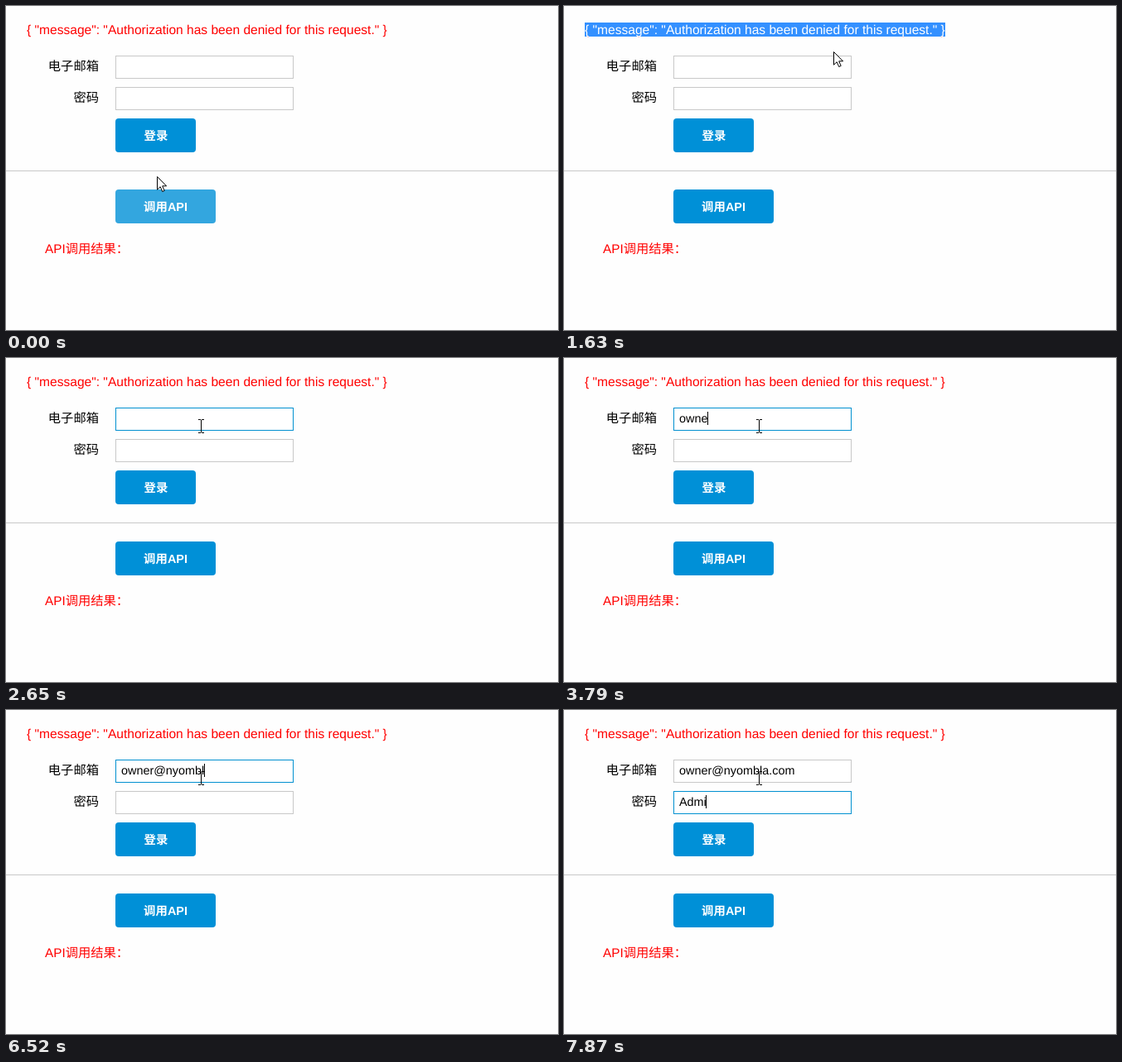
Write an HTML page that moves like this. It is 666 by 392 pixels and loops after 8 s.

```html
<!DOCTYPE html>
<html lang="zh-CN">
<head>
<meta charset="utf-8">
<title>登录</title>
<style>
html, body { margin: 0; width: 100%; height: 100%; overflow: hidden; background: #fefefe; }
svg { display: block; }
text {
  font: 15.3px "Liberation Sans", "Noto Sans CJK SC", "Noto Sans CJK", sans-serif;
  text-rendering: geometricPrecision;
  white-space: pre;
}
text.msg { font-size: 15.57px; }
text.entry, text.btn { font-size: 14.4px; }
text.btn { fill: #fff; text-anchor: middle; font-weight: bold; }
.label { text-anchor: end; }
.red { fill: #f00; }
.box { fill: #fff; stroke: #c8c8c8; }
.focus { fill: none; stroke: #0090d0; }
.blue { fill: #0090d7; }
</style>
</head>
<body>
<svg width="666" height="392" viewBox="0 0 666 392">
  <defs><clipPath id="clip"><rect id="clipBox" y="20" height="17"/></clipPath></defs>

  <text class="msg red" x="25" y="34">{ "message": "Authorization has been denied for this request." }</text>
  <g id="selection" clip-path="url(#clip)">
    <rect x="25" y="20" width="435" height="17" fill="#3390ff"/>
    <text class="msg" x="25" y="34" fill="#fff">{ "message": "Authorization has been denied for this request." }</text>
  </g>

  <text class="label" x="112" y="78">电子邮箱</text>
  <text class="label" x="112" y="116">密码</text>
  <rect class="box" x="132.5" y="60.5" width="214" height="27"/>
  <rect class="box" x="132.5" y="98.5" width="214" height="27"/>
  <rect class="focus" id="mailFocus" x="132.5" y="60.5" width="214" height="27"/>
  <rect class="focus" id="passFocus" x="132.5" y="98.5" width="214" height="27"/>
  <text class="entry" id="mail" x="139" y="78"></text>
  <text class="entry" id="pass" x="139" y="116"></text>
  <rect id="caret" width="1" height="16"/>

  <rect class="blue" x="132" y="136" width="97" height="41" rx="4"/>
  <text class="btn" x="181" y="162">登录</text>
  <rect y="199" width="666" height="1" fill="#c8c8c8"/>
  <rect class="blue" id="api" x="132" y="222" width="121" height="41" rx="4"/>
  <text class="btn" x="192.5" y="248">调用API</text>
  <text class="red" x="47" y="299">API调用结果：</text>

  <path id="arrow" d="M.5 .5V16.2L4.2 12.7L6.7 18.5L9.2 17.4L6.7 11.8H11.6Z" fill="#fff" stroke="#000"/>
  <path id="beam" d="M-3 -7.5H0M1 -7.5H4M.5 -7V8M-3 8.5H0M1 8.5H4" fill="none" stroke="#000"/>
</svg>
<script>
const LOOP = 8000, CLICK = 2120, TAB = 7210, BLINK = 530;

// Bursts of typing: first key, time between keys, text
const mailKeys = keys([3330, 152, 'owner'], [4620, 310, '@n'], [5210, 120, 'yo'],
  [5790, 430, 'mb'], [6520, 150, 'la'], [6790, 105, '.com']);
const passKeys = keys([7470, 133, 'Admi']);
const inputTimes = [CLICK, TAB, ...[...mailKeys, ...passKeys].map(k => k.time)];

function keys(...bursts) {
  return bursts.flatMap(([start, gap, text]) =>
    [...text].map((char, i) => ({ time: start + i * gap, char })));
}

const $ = id => document.getElementById(id);
const set = (id, attrs) => {
  for (const name in attrs) $(id).setAttribute(name, attrs[name]);
};
const mix = (a, b, p) => a + (b - a) * p;

// Progress from 0 to 1 between two times, in n equal steps
function ramp(t, from, to, n) {
  const p = Math.min(1, Math.max(0, (t - from) / (to - from)));
  return Math.floor(p * n + 1e-6) / n;
}

const sweep = t => ramp(t, 790, 1360, 4) ** 1.14;

function pointerAt(t) {
  const move = (x0, y0, x1, y1, p) => [mix(x0, x1, p), mix(y0, y1, p)].map(Math.round);
  if (t < 790) return move(182, 206, 496, 26, ramp(t, 230, 790, 4));
  if (t < 1630) return move(496, 26, 21, 27, sweep(t));
  return move(325, 55, 235, 82, ramp(t, 1630, 2010, 3));
}

function drawPointer(t) {
  const [x, y] = pointerAt(t);
  const overText = y < 40 || y > 60 && y < 88;
  set('arrow', { opacity: overText ? 0 : 1, transform: `translate(${x} ${y})` });
  set('beam', { opacity: overText ? 1 : 0, transform: `translate(${x} ${y})` });
}

function drawCaret(t) {
  const field = t < TAB ? 'mail' : 'pass';
  const width = $(field).textContent ? $(field).getComputedTextLength() : 0;
  const idle = t - Math.max(...inputTimes.filter(time => time <= t));
  set('caret', {
    x: Math.floor(139 + width),
    y: field === 'mail' ? 65 : 103,
    opacity: t >= CLICK && Math.floor(idle / BLINK) % 2 === 0 ? 1 : 0
  });
}

function type(id, list, t) {
  $(id).textContent = list.filter(k => k.time <= t).map(k => k.char).join('');
}

function draw(t) {
  const left = mix(455, 25, ramp(t, 940, 1360, 3));
  set('clipBox', { x: left, width: 460 - left });
  set('selection', { opacity: t >= 930 && t < CLICK ? 1 : 0 });
  set('api', { opacity: mix(.8, 1, sweep(t)) });

  const tabbed = ramp(t, 7090, 7330, 2);
  set('mailFocus', { opacity: ramp(t, 2010, 2400, 3) - tabbed });
  set('passFocus', { opacity: tabbed });
  type('mail', mailKeys, t);
  type('pass', passKeys, t);
  drawCaret(t);
  drawPointer(t);
}

const start = performance.now();
function tick() {
  draw((performance.now() - start) % LOOP);
  requestAnimationFrame(tick);
}
tick();
</script>
</body>
</html>
```
